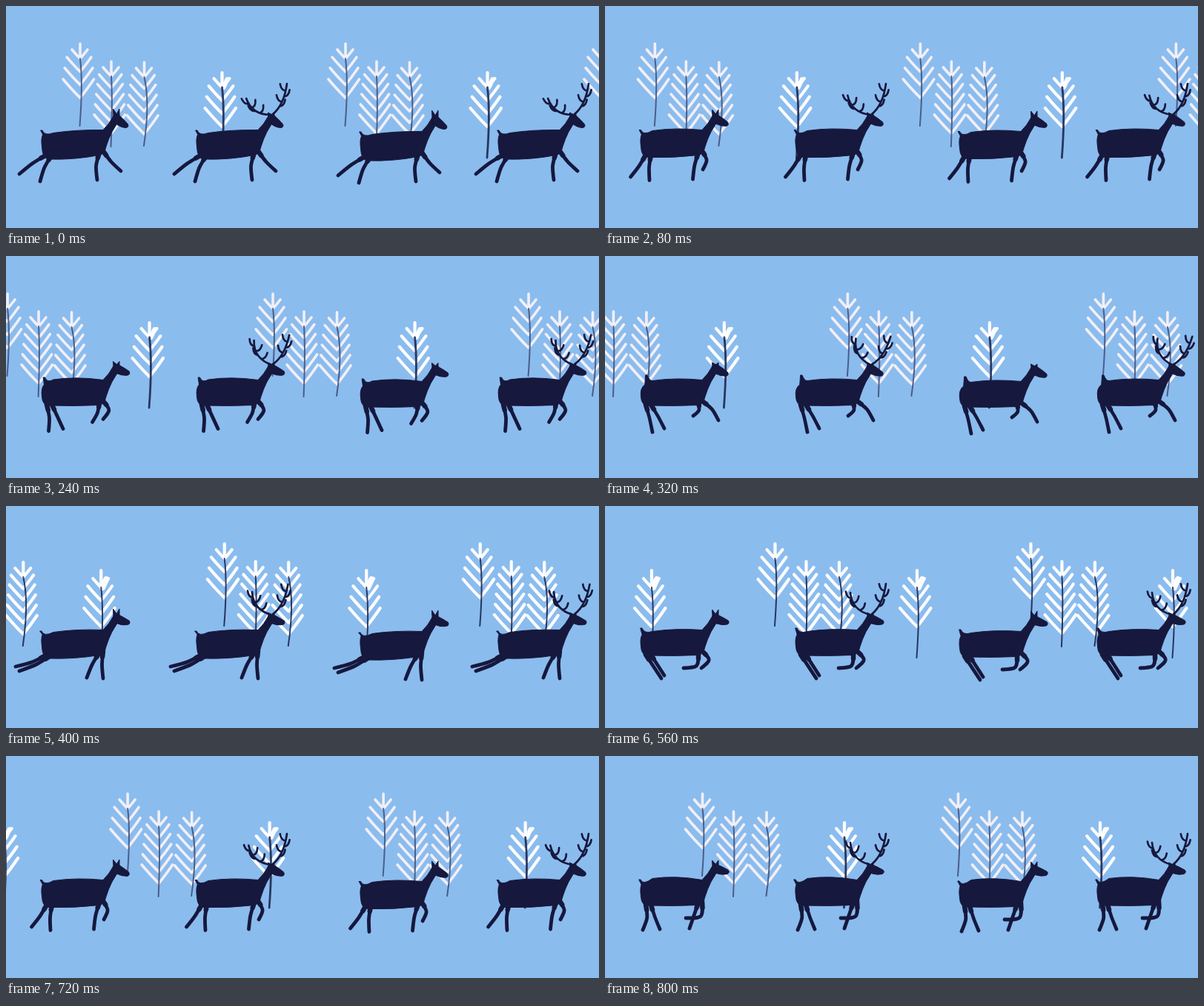
Write an HTML page that moves like this. It is 800x300 px and loops after 880 ms.

```html
<!DOCTYPE html>
<html lang="en">
<head>
<meta charset="utf-8">
<title>Running deer</title>
<style>
html, body { margin: 0; width: 100%; height: 100%; overflow: hidden; background: #8bbcee; }
svg { display: block; width: 800px; height: 300px; }
</style>
</head>
<body>
<svg id="stage" viewBox="0 0 800 300"></svg>
<script>
const STEP = 80, COUNT = 11, SHIFT = 32.65;
const INK = '#16183d';
const stage = document.getElementById('stage');

const TREES = [
  { x: 0, top: 51, base: 124, end: 162, rows: 4, bend: 2 },
  { x: 42, top: 75, base: 172, end: 190, rows: 6, bend: 1 },
  { x: 86.5, top: 76, base: 173, end: 189, rows: 6, bend: 4 },
  { x: 191.5, top: 90, base: 163, end: 205, rows: 4, bend: 2, solo: true }
];

// Each limb: foot x, foot y, knee bend (forward is positive)
const HIPS = [[55, 201], [62, 201], [126, 198], [131, 196]];
const POSES = {
  0: { tail: [48, 168], back: 169, belly: 208, nod: 19, ear: 1, horns: [-15, 0],
    limbs: [[18, 227, -2], [46, 237, -3], [123, 235, -4], [155, 223, -2]] },
  2: { tail: [47, 167], back: 163, belly: 203, nod: 0, ear: .8, horns: [0, 0],
    limbs: [[51, 235, 5], [74, 234, -1], [114, 233, 0], [109, 219, 17]] },
  4: { tail: [56, 161], back: 166, belly: 203, nod: 10, ear: .5, horns: [13, 9],
    limbs: [[64, 238, 1], [80, 233, 1], [119, 216, 6], [153, 222, 4]] },
  5: { tail: [47, 169], back: 168, belly: 207, nod: 3, ear: 1, horns: [2, 2],
    limbs: [[13, 217, 3], [18, 223, 3], [109, 232, -2], [131, 233, -2]] },
  7: { tail: [49, 165], back: 167, belly: 203, nod: 2, ear: .9, horns: [0, 0],
    limbs: [[76, 233, 0], [80, 229, 0], [106, 219, 14], [130, 219, 13]] }
};

const mix = (a, b) => Array.isArray(a) ? a.map((v, i) => mix(v, b[i])) : (a + b) / 2;
function between(a, b) {
  return Object.fromEntries(Object.keys(a).map(k => [k, mix(a[k], b[k])]));
}
POSES[1] = between(POSES[0], POSES[2]);
POSES[3] = between(POSES[2], POSES[4]);
POSES[6] = between(POSES[5], POSES[7]);

const line = (d, color, width, more = '') =>
  `<path d="${d}" fill="none" stroke="${color}" stroke-width="${width}" ${more}/>`;
const fill = d => `<path d="${d}" fill="${INK}" stroke="${INK}"/>`;
const place = (x, y, inner) => `<g transform="translate(${x} ${y})">${inner}</g>`;

// Leaf pairs grow longer and steeper down the trunk
function tree(t, bold) {
  const strong = t.solo || bold;
  const lift = t.solo && bold ? 3 : 0;
  const first = t.top + 20;
  let leaves = `M0 ${t.top - lift}V${first}`;
  for (let i = 0; i < t.rows; i++) {
    const u = Math.sqrt(i / (t.rows - 1));
    const y = first + (t.base - first) * i / (t.rows - 1);
    const rise = 12 + 13 * u;
    for (const reach of [-11 - 12 * u, 10 + 8.5 * u])
      leaves += `M${reach} ${y - rise}Q${reach * .45} ${y - rise * .4} 0 ${y}`;
  }
  const mid = (first + t.end) / 2 - 12;
  const trunk = `M0 ${first}Q${t.bend * 2} ${mid} -.5 ${t.end}`;
  const tuft = t.solo ? line(`M2 ${first}L7 ${t.top + 9}`, '#fdfdff', bold ? 8 : 6) : '';
  return line(leaves, strong ? '#fdfdff' : '#f1eff7', strong ? 4.2 : 3.6) + tuft +
    line(trunk, strong ? '#1d2750' : '#43537d', t.solo && !bold ? 2.8 : 2, 'opacity=".9"');
}

function limb([fx, fy, bend], i) {
  const [x, y] = HIPS[i];
  const dx = fx - x, dy = fy - y, s = bend / Math.hypot(dx, dy);
  const kx = x + dx / 2 + dy * s, ky = y + dy / 2 - dx * s;
  const knee = `${kx} ${ky}`;
  return line(`M${x} ${y}C${knee} ${knee} ${fx} ${fy}`, INK, 4.8) +
    line(`M${x} ${y}L${x + (kx - x) * .4} ${y + (ky - y) * .4}`, INK, 6.5);
}

function body({ tail: [x, y], back, belly }) {
  return `M${x - 1} ${y}L${x + 1} ${y}Q${x + 4} ${y + 8} 64 ${back + 2.5}` +
    `Q95 ${back - 2} 131 167.5Q139 160 146 147L154 152Q149 160 143 170` +
    `Q138 180 135 190Q133 200 126 201.5Q92 ${belly} 60 ${belly - 1}` +
    `Q49 ${belly} 48.5 190Q47 179 ${(x + 51) / 2} 174Z`;
}

// A curved beam with tines curling up on alternating sides
function antler(x, y, cx, cy, tx, ty, turn) {
  const at = (t, a, b, c) => (1 - t) ** 2 * a + 2 * t * (1 - t) * b + t * t * c;
  let d = `M${x} ${y}Q${cx} ${cy} ${tx} ${ty}`, side = 1;
  for (let t = .35; t < .9; t += .16) {
    d += `M${at(t, x, cx, tx)} ${at(t, y, cy, ty)}q${side * 6} 0 ${side * 7.5} -9`;
    side = -side;
  }
  return line(d, INK, 2.7, `transform="rotate(${turn} 149 147)"`);
}

function deer(p, buck) {
  const tip = 149 - 10 * (buck ? .5 : p.ear);
  const ears = `M145 149L144.5 ${tip}L150 147ZM148 148L153 ${tip}L153 149Z`;
  const head = 'M144 151Q146 146 152 147Q159 150 166 154Q169 157 165 159.5Q158 161 152 159Q146 158 144 151Z';
  const horns = buck
    ? antler(149, 147, 124, 141, 122, 117, p.horns[0]) +
      antler(151, 146, 166, 134, 170, 105, p.horns[1])
    : '';
  return horns + p.limbs.map(limb).join('') + fill(body(p) + ears) +
    `<g transform="rotate(${p.nod} 148 152)">${fill(head)}</g>`;
}

function draw(n) {
  const pose = n % 8, bold = pose > 4;
  let out = '<rect width="800" height="300" fill="#8bbcee"/>';
  for (const start of [100, 458, 803])
    for (const t of TREES) {
      const x = start + t.x - SHIFT * n;
      if (x > -40 && x < 840) out += place(x, 0, tree(t, bold));
    }
  const doe = deer(POSES[pose], false), buck = deer(POSES[pose], true);
  out += place(0, 0, doe) + place(209, 0, buck) + place(430, 2, doe) + place(616, 0, buck);
  stage.innerHTML = `<g stroke-linecap="round" stroke-linejoin="round">${out}</g>`;
}

let shown = -1;
const begin = performance.now();
function tick() {
  const n = Math.floor((performance.now() - begin) / STEP) % COUNT;
  if (n !== shown) draw(shown = n);
  requestAnimationFrame(tick);
}
tick();
</script>
</body>
</html>
```
